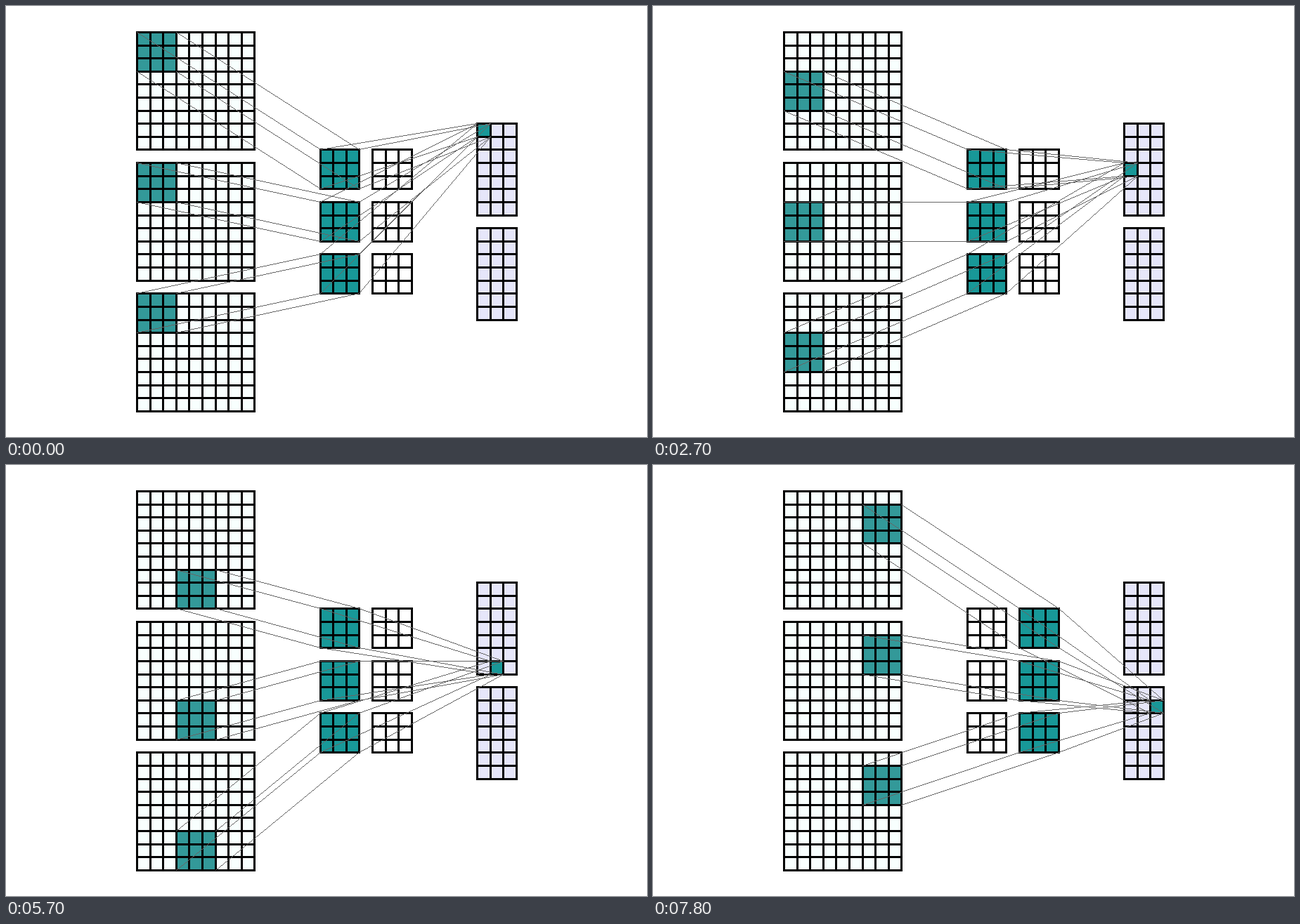
An HTML page with a canvas that plays this animation: 912x614 px, repeating every 8 s.

```html
<!DOCTYPE html>
<html lang="en">
<head>
<meta charset="utf-8">
<title>Convolution</title>
<style>
  html, body { margin: 0; height: 100%; overflow: hidden; background: #fff; }
  canvas { display: block; }
</style>
</head>
<body>
<canvas id="stage" width="912" height="614"></canvas>
<script>
const ctx = document.getElementById('stage').getContext('2d');
const CELL = 18.62, STEP = 300, LOOP = 8000;
const INPUT_ROWS = [0, 10, 20], KERNEL_ROWS = [9, 13, 17];
const KERNEL_COLS = [14, 18], OUTPUT_ROWS = [7, 15], OUTPUT_COL = 26;

// Cell units to whole pixels
const px = col => Math.floor(186.4 + col * CELL);
const py = row => Math.floor(37.4 + row * CELL);

function block(col, row, cols, rows, color) {
  ctx.fillStyle = color;
  ctx.fillRect(px(col), py(row), px(col + cols) - px(col), py(row + rows) - py(row));
}

function grid(col, row, cols, rows) {
  const x = px(col) - 1, y = py(row) - 1;
  const w = px(col + cols) + 2 - x, h = py(row + rows) + 2 - y;
  ctx.fillStyle = '#000';
  for (let i = 0; i <= cols; i++) ctx.fillRect(px(col + i) - 1, y, 3, h);
  for (let i = 0; i <= rows; i++) ctx.fillRect(x, py(row + i) - 1, w, 3);
}

// One-pixel line without smoothing
function line(x0, y0, x1, y1) {
  const n = Math.max(Math.abs(x1 - x0), Math.abs(y1 - y0));
  for (let i = 0; i <= n; i++) {
    ctx.fillRect(Math.round(x0 + (x1 - x0) * i / n), Math.round(y0 + (y1 - y0) * i / n), 1, 1);
  }
}

// Joins matching corners of two square blocks
function project(colA, rowA, sizeA, colB, rowB, sizeB) {
  ctx.fillStyle = '#666';
  for (const u of [0, 1]) for (const v of [0, 1]) {
    line(px(colA + u * sizeA), py(rowA + v * sizeA),
         px(colB + u * sizeB), py(rowB + v * sizeB));
  }
}

function draw(step) {
  const filter = Math.floor(step / 21);
  const row = Math.floor(step % 21 / 3), col = step % 3;
  const kernelCol = KERNEL_COLS[filter];
  const outCol = OUTPUT_COL + col, outRow = OUTPUT_ROWS[filter] + row;

  ctx.fillStyle = '#fff';
  ctx.fillRect(0, 0, 912, 614);

  for (const top of INPUT_ROWS) {
    block(0, top, 9, 9, '#f8fffe');
    block(col * 3, top + row, 3, 3, '#339999');
    grid(0, top, 9, 9);
  }
  for (const top of KERNEL_ROWS) {
    block(kernelCol, top, 3, 3, '#189898');
    for (const left of KERNEL_COLS) grid(left, top, 3, 3);
  }
  for (const top of OUTPUT_ROWS) block(OUTPUT_COL, top, 3, 7, '#e6e6fa');
  block(outCol, outRow, 1, 1, '#189898');
  for (const top of OUTPUT_ROWS) grid(OUTPUT_COL, top, 3, 7);

  KERNEL_ROWS.forEach((top, i) => {
    project(col * 3, INPUT_ROWS[i] + row, 3, kernelCol, top, 3);
    project(kernelCol, top, 3, outCol, outRow, 1);
  });
}

const start = performance.now();
function tick() {
  draw(Math.floor((performance.now() - start) % LOOP / STEP));
  requestAnimationFrame(tick);
}
tick();
</script>
</body>
</html>
```
